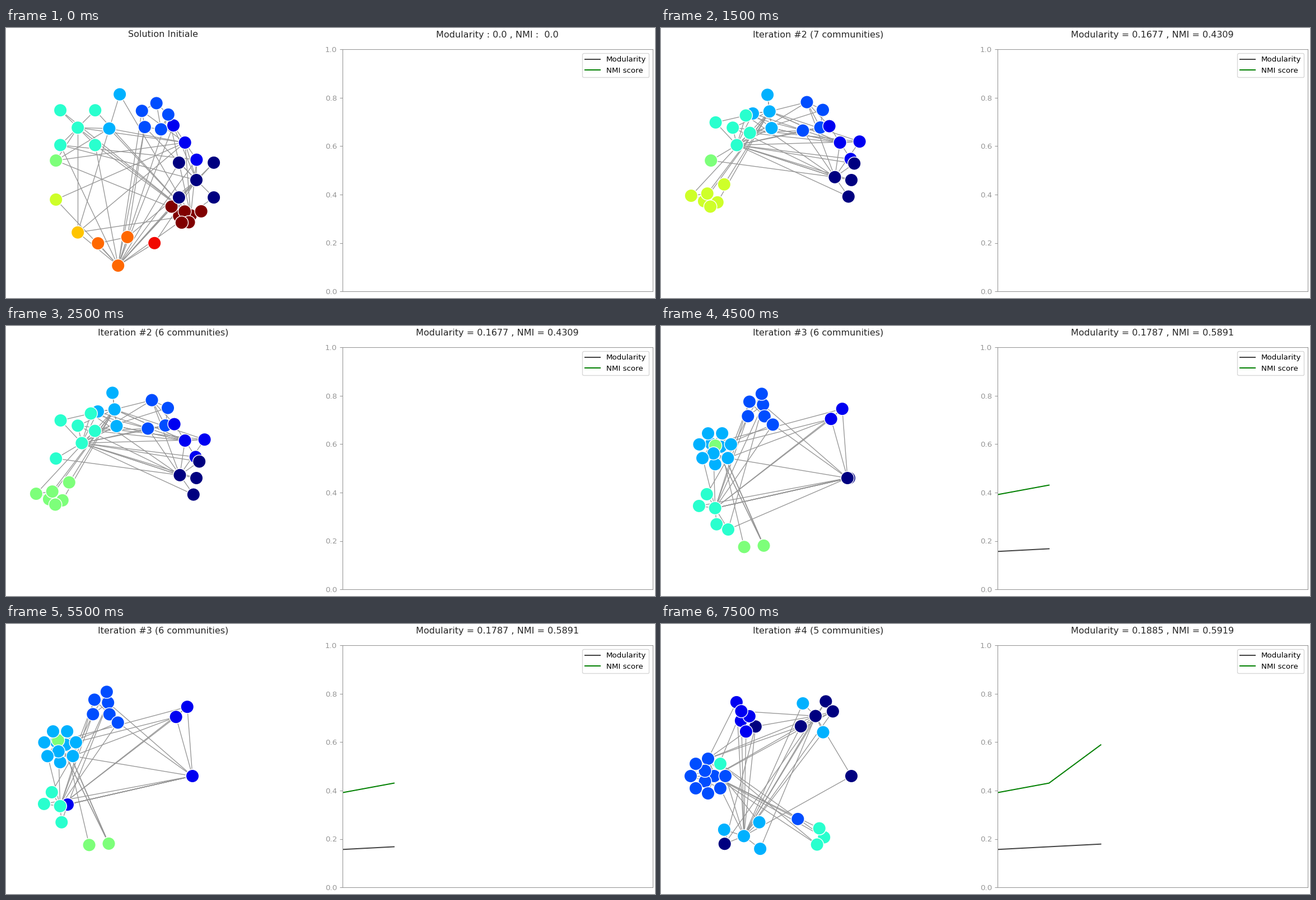
Write a matplotlib script that moves like this. It is 1159 px wide and 483 px high and loops after 8000 ms.

```python
from math import cos, radians, sin

import matplotlib.pyplot as plt
from matplotlib.animation import FuncAnimation
from matplotlib.collections import LineCollection

W, H, DPI = 1159, 483, 96
STEP = 500
GRAY = "#969696"
plt.rcParams["font.family"] = "DejaVu Sans"

# Zachary's karate club, each edge listed once under its lower node
LINKS = {
    0: [1, 2, 3, 4, 5, 6, 7, 8, 10, 11, 12, 13, 17, 19, 21, 31],
    1: [2, 3, 7, 13, 17, 19, 21, 30], 2: [3, 7, 8, 9, 13, 27, 28, 32],
    3: [7, 12, 13], 4: [6, 10], 5: [6, 10, 16], 6: [16], 8: [30, 32, 33],
    9: [33], 13: [33], 14: [32, 33], 15: [32, 33], 18: [32, 33], 19: [33],
    20: [32, 33], 22: [32, 33], 23: [25, 27, 29, 32, 33], 24: [25, 27, 31],
    25: [31], 26: [29, 33], 27: [33], 28: [31, 33], 29: [32, 33],
    30: [32, 33], 31: [32, 33], 32: [33],
}
EDGES = [(a, b) for a, ends in LINKS.items() for b in ends]
NODES = range(34)


def polar(center, rx, ry, angle):
    return center[0] + rx * cos(radians(angle)), center[1] - ry * sin(radians(angle))


def circle(center, radius, tilt, spec, steps=None):
    """Spread nodes evenly on a circle; '-' is a gap, '+' stacks nodes."""
    places = spec.split()
    steps = steps or len(places)
    return {int(n): polar(center, radius, radius, tilt + 360 * i / steps)
            for i, place in enumerate(places) if place != "-"
            for n in place.split("+")}


def group(slot, core="", ring="", spread=30, tilt=0, steps=None, reach=1):
    """A community: a tight core inside a wider ring of members."""
    def place(slots):
        center = polar((212, 272), 128 * reach, 124 * reach, 360 * slot / slots)
        inner = 0.35 * spread if " " in core else 0
        return (circle(center, inner, tilt, core)
                | circle(center, spread, tilt, ring, steps))
    return int(slot + 0.5), place


def layout(slots, *groups):
    """Set the communities around one big circle: {node: (community, point)}."""
    return {n: (community, point) for community, place in groups
            for n, point in place(slots).items()}


def relabel(nodes, rule):
    return {n: (rule(n, community), point) for n, (community, point) in nodes.items()}


initial = layout(
    11,
    group(0, "32", "15 14 18 20", 44, 45),
    group(1, "2", "28 8", 37, 124),
    group(2, "", "31 24 27 23 25", 25, 10),
    group(3, "", "12 3", 32, 73),
    group(4, "1", "21 17 30 19", 44, 45),
    group(5, "7"), group(6, "9"), group(7, "13"),
    group(8, "", "29 26 33", 31, 42),
    group(9, "22"),
    group(10, "0 6 4 16 10", "11 5", 31, 21, 3),
)

second = layout(
    11,
    group(0, "22", "20 15+32 18", 30, 80, 4),
    group(1, "2", "9 8 - 28", 35, -57, 6),
    group(2, "", "24 31 - 23 25", 27, 28),
    group(3, "0+1+17+21", "12 13 3+7+19", 30, 97, 4),
    group(4, "30", "26 - 33 27 29", 32, 163, 6),
    group(5, "14"),
    group(6, "- 6 5 16 10", "11 4", 36, 49, 3),
)
second_merged = relabel(second, lambda n, c: c - (c > 4))

third = layout(
    7,
    group(0, "14+15+18+22", "32", 7, 180),
    group(0.96, "", "30 8", 13.5, 42, reach=1.22),
    group(2, "23 25", "24 28 27 - 31", 30, 97, 7),
    group(3, "0 1 13", "7 21 12 19 17 3 2", 29, 13),
    group(4, "33", "29 - 9 20 - 26", 29, 18, 7),
    group(5, "4+5+6+10+16", "11", 35, 184),
)
# Trial moves: a few nodes jump towards other communities
LEAVES = (14, 15, 18, 22)
third_moved = third | {n: (0, (336, 272)) for n in LEAVES} | {
    10: (5, (97, 214)), 29: (4, (120, 364))}
third_final = third | {n: (0, third[32][1]) for n in LEAVES} | {
    32: (1, third[32][1]), 10: (5, (93, 208)), 29: (1, (110, 323))}

fourth = layout(
    6,
    group(0.1, "22", reach=0.79),
    group(1, "", "15+18 30 14 - - 8+32", 34, 5, 8),
    group(2, "24 25 27", "31 23 - - - 28", 26, -14, 9),
    group(3, "0 1", "12 3 7 2 21 17 13 19", 28, 30, 9),
    group(4, "33", "29 26 - - 9+20", 28, 124, 9),
    group(5, "4+10", "5+6+16 - - - - 11", 33, -25, 9),
)

fourth_final = layout(
    6,
    group(0, "22"),
    group(1, "32", "30 14 - 15 - 8 - 18", 32, 15, 9),
    group(2, "31 24 25", "27 - - - 28 23", 28, 118, 9),
    group(3, "0 3 1", "19 10 2 12 7 17 21 13", 31),
    group(4, "33", "20 - 9 - - 26 29", 37, -38, 9),
    group(5, "- - 5 4 6+16", "11", 44, 136),
)
JOINED = {23: 0, 29: 0, 15: 3, 18: 3, 11: 2, 10: 4}
fourth_final = relabel(fourth_final, lambda n, c: JOINED.get(n, max(c - 1, 0)))

MODULARITY = [0.1564, 0.1677, 0.1787, 0.1885]
NMI = [0.3914, 0.4309, 0.5891, 0.5919]

# (layout, iteration, number of communities)
SCENES = [
    (initial, 0, 11), (initial, 1, 11), (second, 2, 7), (second_merged, 2, 6),
    (third, 3, 6), (third_moved, 3, 6), (third_final, 3, 6),
    (fourth, 4, 6), (fourth_final, 4, 5),
]

fig = plt.figure(figsize=(W / DPI, H / DPI), dpi=DPI, facecolor="white")

net = fig.add_axes([0, 0, 1, 1])
net.set(xlim=(0, W), ylim=(H, 0))
net.axis("off")
edge_lines = net.add_collection(LineCollection([], colors=GRAY, linewidths=1, zorder=1))
dots = net.scatter([0] * len(NODES), [0] * len(NODES), s=308,
                   edgecolors="white", linewidths=1.05, zorder=2)
jet = plt.get_cmap("jet")

L, R, T, B = 600.5, 1155, 38.5, 471
chart = fig.add_axes([L / W, 1 - B / H, (R - L) / W, (B - T) / H])
chart.patch.set_alpha(0)
chart.set(xlim=(0, 6), ylim=(0, 1), xticks=[])
chart.tick_params(colors=GRAY, labelsize=10)
chart.spines[:].set_color(GRAY)
mod_line, = chart.plot([], [], color="#444444", label="Modularity")
nmi_line, = chart.plot([], [], color="green", label="NMI score")
chart.legend(loc="upper right", fontsize=10)


def heading(x):
    return fig.text(x / W, 1 - 16.5 / H, "", ha="center", va="baseline",
                    fontsize=12, color="#262626")


net_title, score_title = heading(281), heading(877.7)


def draw(i):
    nodes, iteration, count = SCENES[(i + 1) // 2]
    points = [nodes[n][1] for n in NODES]
    dots.set_offsets(points)
    dots.set_facecolors([jet(nodes[n][0] / 10) for n in NODES])
    edge_lines.set_segments([(points[a], points[b]) for a, b in EDGES])

    done = max(iteration - 1, 0)
    mod_line.set_data(range(done), MODULARITY[:done])
    nmi_line.set_data(range(done), NMI[:done])
    if iteration:
        net_title.set_text(f"Iteration #{iteration} ({count} communities)")
        score_title.set_text(f"Modularity = {MODULARITY[done]:.4f} , NMI = {NMI[done]:.4f}")
    else:
        net_title.set_text("Solution Initiale")
        score_title.set_text("Modularity : 0.0 , NMI :  0.0")
    return dots, edge_lines, mod_line, nmi_line, net_title, score_title


anim = FuncAnimation(fig, draw, frames=16, interval=STEP, repeat=True, repeat_delay=0)
plt.show()
```
